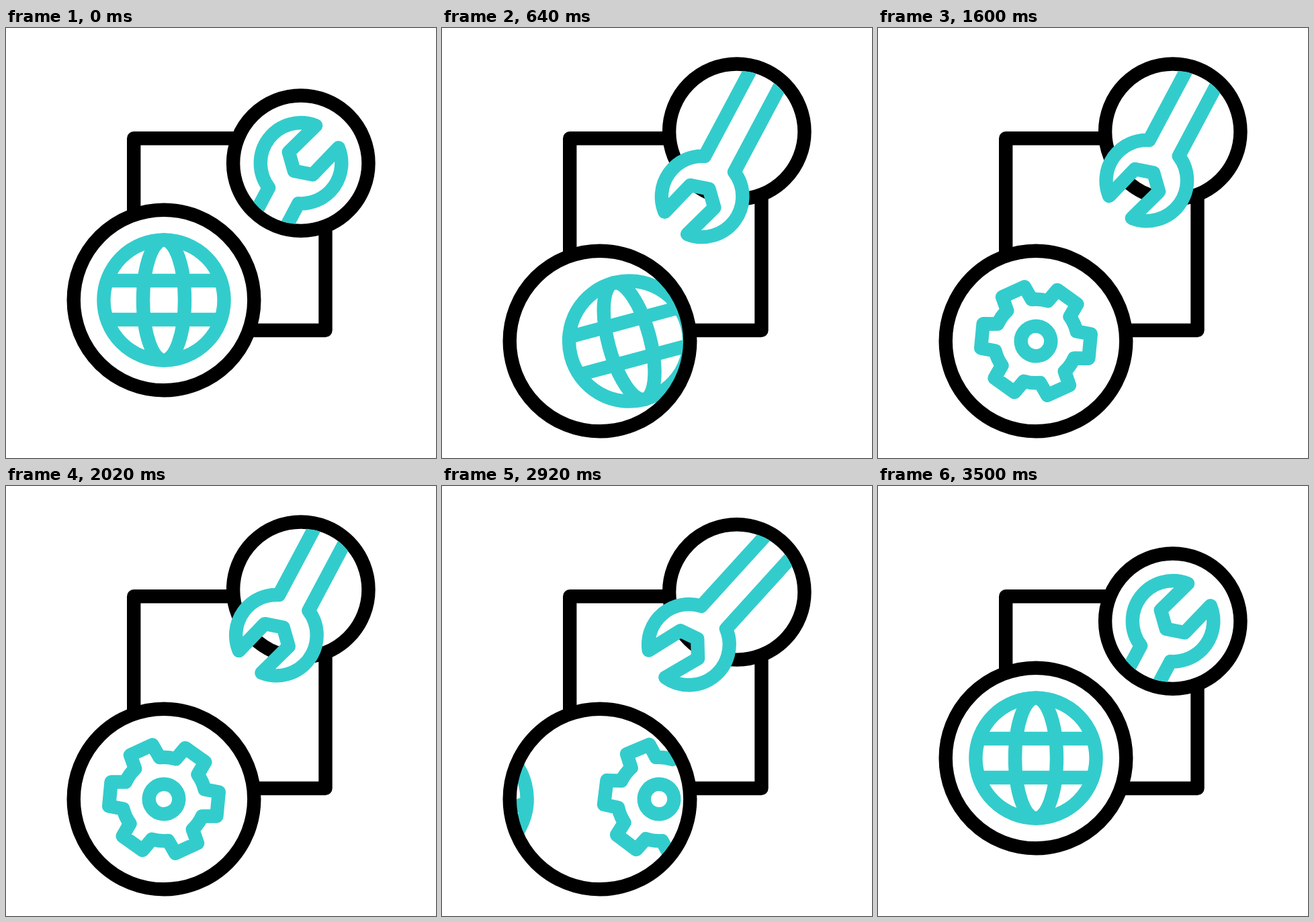
Animation, 640 px wide and 640 px high, one loop 3600 ms. Source, as an HTML page:

```html
<!DOCTYPE html>
<html lang="en">
<head>
<meta charset="utf-8">
<title>Web maintenance icon</title>
<style>
  html, body { margin: 0; width: 100%; height: 100%; overflow: hidden; background: #fff; }
  svg { display: block; width: 100vw; height: 100vh; }
  .ink, .teal { fill: none; stroke: #000; stroke-width: 20.4; stroke-linejoin: round; stroke-linecap: round; }
  .teal { stroke: #3cc; }
  .white { fill: #fff; }
</style>
</head>
<body>
<svg viewBox="0 0 640 640">
  <defs>
    <clipPath id="port"><circle r="125"/></clipPath>
    <!-- the handle stays inside the ring, the head may leave it -->
    <clipPath id="sleeve">
      <circle r="91"/>
      <rect x="-112" y="-300" width="224" height="300" transform="rotate(28)"/>
    </clipPath>
  </defs>

  <rect class="ink" x="190.2" y="164.3" width="285.3" height="285.7"/>

  <g id="big">
    <circle class="white" r="134"/>
    <g clip-path="url(#port)">
      <g id="globe" class="teal">
        <circle r="89.6"/>
        <ellipse rx="31" ry="89.6"/>
        <path d="M-84 -29H84M-84 29H84"/>
      </g>
      <g id="gear" class="teal">
        <path id="teeth"/>
        <circle r="22.3"/>
      </g>
    </g>
    <circle class="ink" r="134.3"/>
  </g>

  <g id="small">
    <circle class="ink white" r="100.7" style="fill:#fff"/>
    <g id="spin">
      <g clip-path="url(#sleeve)">
        <path id="wrench" class="teal" style="fill:#fff"
          d="M-141.6 213.1L-47.7 36.5A60.2 60.2 0 0 1 22.2 -56L-18 -16.5L-10 11.5L17.7 17L56 -23A60.2 60.2 0 0 1 -3.5 60L-97.4 236.5"/>
      </g>
    </g>
  </g>
</svg>
<script>
const LOOP = 3600, GAP = 286, REACH = 111, TILT = 28 * Math.PI / 180;
const $ = id => document.getElementById(id);
const put = (id, x, y, turn = 0) =>
  $(id).setAttribute('transform', `translate(${x} ${y}) rotate(${turn})`);

// eased progress from time a to time b
const ease = (t, a, b) => {
  const p = Math.min(1, Math.max(0, (t - a) / (b - a)));
  return p * p * (3 - 2 * p);
};
// rises over a..b, falls over c..d
const pulse = (t, a, b, c, d) => ease(t, a, b) - ease(t, c, d);

function gearPath() {
  const at = (r, deg) => {
    const a = deg * Math.PI / 180;
    return `${(r * Math.cos(a)).toFixed(2)} ${(r * Math.sin(a)).toFixed(2)}`;
  };
  let d = '';
  for (let a = 0; a < 360; a += 60) {
    d += a ? `A62.3 62.3 0 0 1 ${at(62.3, a - 18.8)}` : `M${at(62.3, -18.8)}`;
    d += `L${at(82.5, a - 12.7)}L${at(82.5, a + 12.7)}L${at(62.3, a + 18.8)}`;
  }
  return d + `A62.3 62.3 0 0 1 ${at(62.3, -18.8)}Z`;
}

function draw(t) {
  const drop = pulse(t, 0, 500, 3000, 3500);
  const out = ease(t, 400, 1377), back = ease(t, 2600, 3470);
  put('big', 235, 405 + 61 * drop);
  put('globe', GAP * (t < 2000 ? out : back - 1), 0, -15 * drop);
  const s = t - 2020;
  put('gear', GAP * (out - 1 + back), 0, 5.2 + 0.1403 * s - 5.575e-6 * s * s);

  const lift = pulse(t, 0, 600, 2800, 3500);
  const slide = REACH * (pulse(t, 0, 600, 600, 1200) + pulse(t, 1200, 1800, 1800, 2400)
    + pulse(t, 2400, 3000, 3000, 3500));
  put('small', 438.8, 201.2 - 47 * lift);
  put('spin', 0, 0, -180 * lift);
  put('wrench', slide * Math.sin(TILT), -slide * Math.cos(TILT));
}

$('teeth').setAttribute('d', gearPath());
const start = performance.now();
function tick() {
  draw((performance.now() - start) % LOOP);
  requestAnimationFrame(tick);
}
tick();
</script>
</body>
</html>
```
